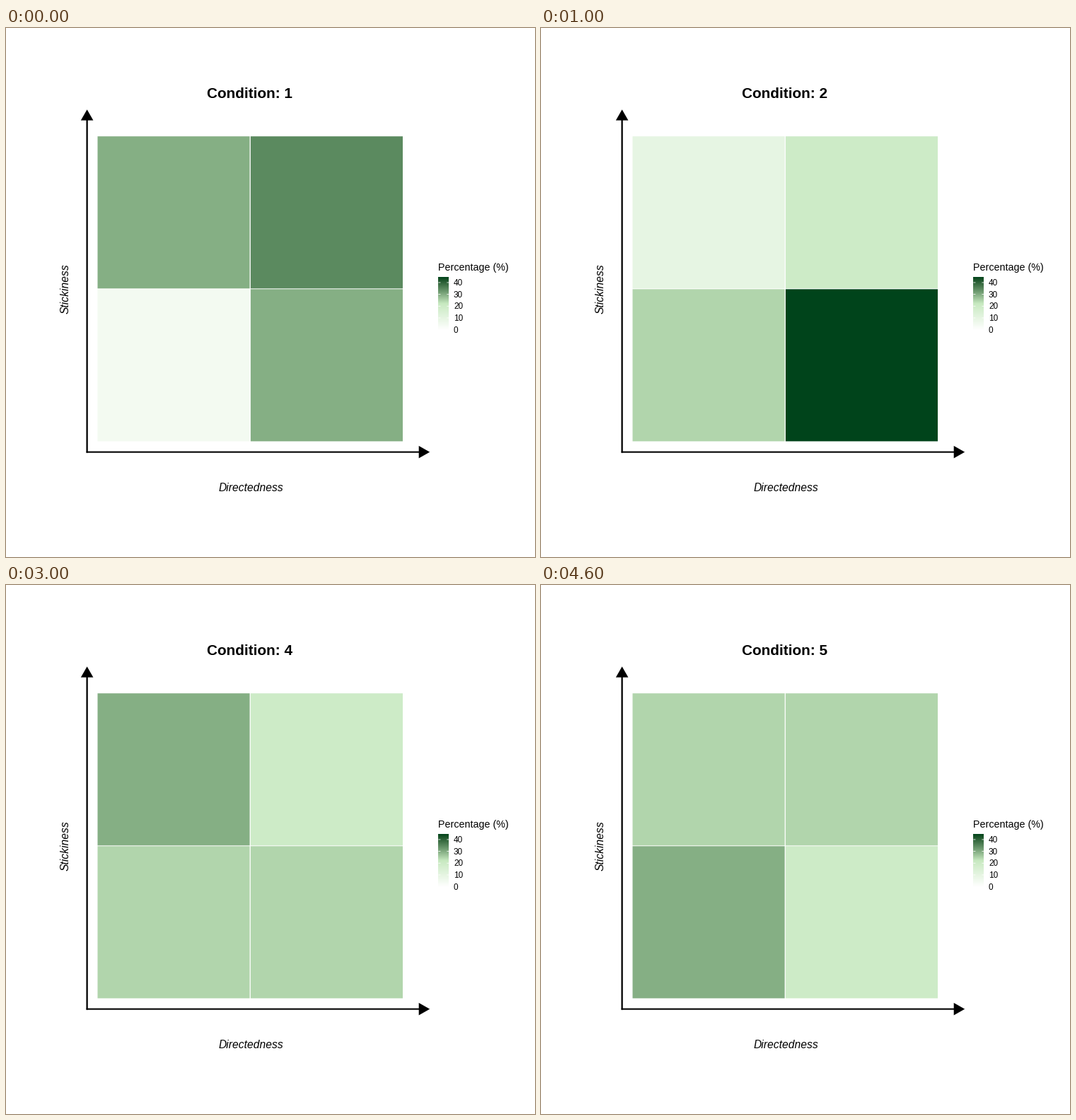
Recreate the animation shown at these times as a matplotlib script. Size 748 by 748 pixels, loop 5000 ms.

```python
import numpy as np
import matplotlib.pyplot as plt
from matplotlib.animation import FuncAnimation
from matplotlib.colors import to_rgb
from matplotlib.patches import Polygon, Rectangle

SIZE, DPI = 748, 64
PT = 72 / DPI  # points per pixel
TOP = 45  # upper end of the colour scale

# Percentages per condition: top left, top right, bottom left, bottom right
SHARES = [
    (30, 35, 5, 30),
    (10, 20, 25, 45),
    (20, 15, 45, 20),
    (30, 20, 25, 25),
    (25, 25, 30, 20),
]

plt.rcParams["font.family"] = "Liberation Sans"

XYZ = np.array([[0.4124, 0.3576, 0.1805],
                [0.2126, 0.7152, 0.0722],
                [0.0193, 0.1192, 0.9505]])
WHITE = XYZ.sum(axis=1)
LAB = np.array([[0, 116, 0], [500, -500, 0], [0, 200, -200]])


def to_lab(color):
    c = np.array(to_rgb(color))
    lin = np.where(c > 0.04045, ((c + 0.055) / 1.055) ** 2.4, c / 12.92)
    t = XYZ @ lin / WHITE
    f = np.where(t > 0.008856, np.cbrt(t), 7.787 * t + 16 / 116)
    return LAB @ f


def from_lab(lab):
    f = np.linalg.solve(LAB, lab)
    t = np.where(f > 0.2069, f ** 3, (f - 16 / 116) / 7.787)
    lin = np.clip(np.linalg.solve(XYZ, t * WHITE), 0, 1)
    c = np.where(lin > 0.0031308, 1.055 * lin ** (1 / 2.4) - 0.055, 12.92 * lin)
    return np.clip(c, 0, 1)


STOPS = np.array([to_lab(c) for c in ("#ffffff", "#c7e9c0", "#00441b")])


def shade(value):
    pos = value / TOP * 2
    lab = [np.interp(pos, [0, 1, 2], channel) for channel in STOPS.T]
    return from_lab(np.array(lab))


fig = plt.figure(figsize=(SIZE / DPI, SIZE / DPI), dpi=DPI, facecolor="white")
ax = fig.add_axes([0, 0, 1, 1])
ax.set_xlim(0, SIZE)
ax.set_ylim(SIZE, 0)
ax.axis("off")


def line(xs, ys, width, color="black"):
    ax.plot(xs, ys, color=color, lw=width * PT, solid_capstyle="butt", snap=False)


def label(x, y, text, px, **style):
    return ax.text(x, y, text, fontsize=px * PT, ha="left", va="baseline",
                   rotation_mode="anchor", **style)


# Tiles
SIDE = 215.1
tiles = [Rectangle((x, y), SIDE, SIDE, lw=0, snap=False)
         for y in (153.2, 369.3) for x in (129.5, 345.9)]
for tile in tiles:
    ax.add_patch(tile)

# Axes with arrow heads
OX, OY = 114.6, 599.6
line([OX, OX], [OY + 1, 125], 2.3)
line([OX - 1, 590], [OY, OY], 2.1)
for head in ([(OX, 115.3), (OX - 8.8, 130.6), (OX + 8.8, 130.6)],
             [(599.2, OY), (583.7, OY - 8.8), (583.7, OY + 8.8)]):
    ax.add_patch(Polygon(head, fc="black", lw=0, snap=False))

# Colour bar
BX, BY, BW, BH = 611.4, 351.6, 15, 75
ramp = np.array([[shade(v)] for v in np.linspace(TOP, 0, 150)])
ax.imshow(ramp, extent=(BX, BX + BW, BY + BH, BY), aspect="auto",
          interpolation="bilinear")
ax.set_xlim(0, SIZE)
ax.set_ylim(SIZE, 0)
for v in range(0, 50, 10):
    y = BY + BH * (1 - v / TOP)
    line([BX, BX + 3], [y, y], 0.8, "white")
    line([BX + BW - 3, BX + BW], [y, y], 0.8, "white")
    label(633, y + 4.2, str(v), 11.7)

label(611, 343, "Percentage (%)", 14.3)
label(300.2, 655, "Directedness", 15.6, style="italic")
label(89, 403.6, "Stickiness", 15.6, style="italic", rotation=90)
title = label(284.2, 99, "", 20.8, weight="bold")


def update(i):
    title.set_text(f"Condition: {i + 1}")
    for tile, value in zip(tiles, SHARES[i]):
        tile.set_facecolor(shade(value))
    return [title, *tiles]


anim = FuncAnimation(fig, update, frames=len(SHARES), interval=1000,
                     repeat=True, repeat_delay=0)
plt.show()
```
